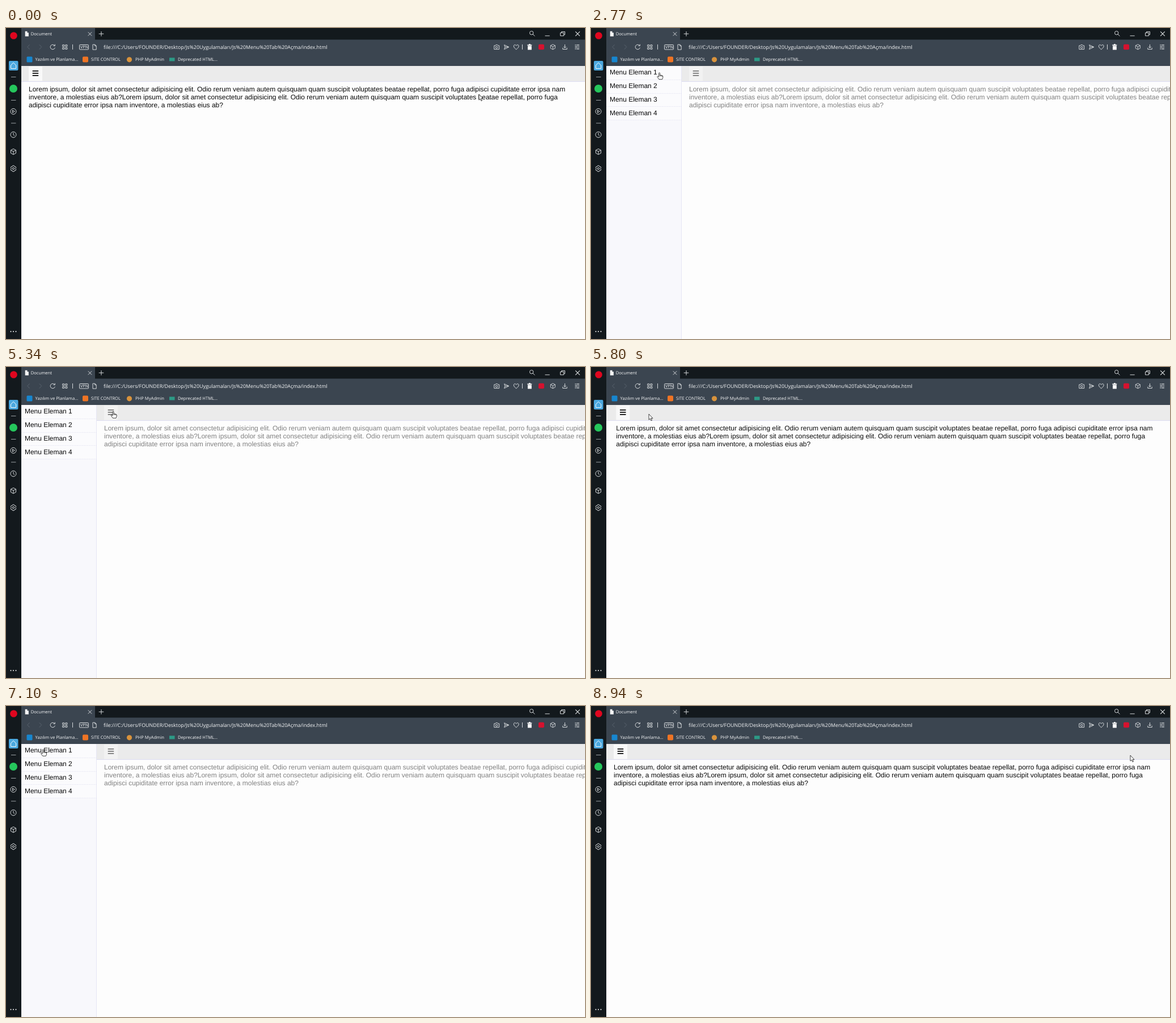
Animation, 1021 px wide and 549 px high, one loop 8970 ms. Source, as an HTML page:

```html
<!DOCTYPE html>
<html lang="tr">
<head>
<meta charset="utf-8">
<title>Document</title>
<style>
  html, body { margin: 0; width: 100%; height: 100%; overflow: hidden; background: #fdfdfd; }
  svg { display: block; width: 100%; height: 100%; }
  text { text-rendering: geometricPrecision; white-space: pre; }
  .page { font: 11.96px "Liberation Sans", Arial, sans-serif; fill: #080808; }
  .ui { font: 7.65px "Open Sans", "Noto Sans", sans-serif; fill: #f4f5f6; }
  .icon { fill: none; stroke: #dde0e2; stroke-width: .95; stroke-linejoin: round; }
  .pointer { fill: #fff; stroke: #222; stroke-width: .85; stroke-linejoin: round; }
</style>
</head>
<body>
<svg viewBox="0 0 1021 549">
  <defs>
    <clipPath id="view"><rect x="26" y="67" width="995" height="482"/></clipPath>
    <path id="cube" d="M0-5 4.5-2.7V2.7L0 5-4.5 2.7V-2.7ZM-4.5-2.7 0-.3 4.5-2.7M0-.3V5"/>
    <path id="cross" d="M-3.2-3.2 3.2 3.2M3.2-3.2-3.2 3.2"/>
    <path id="sheet" d="M-3-4.5H.8L3.2-2V4.5H-3ZM.8-4.5V-2H3.2"/>
  </defs>

  <g clip-path="url(#view)">
    <rect x="26" y="67" width="995" height="482" fill="#fdfdfd"/>
    <rect x="26" y="67" width="995" height="27" fill="#ebebeb"/>
    <path d="M26 94.5H1021" stroke="#dcdcf1"/>

    <g id="menu">
      <rect x="-107" y="67" width="133" height="482" fill="#f8f8fc"/>
      <rect x="-107" y="67" width="133" height="96" fill="#fbfbfd"/>
      <path d="M26.5 67V549" stroke="#e6e6f5"/>
      <path d="M-107 91.5H26M-107 115.5H26M-107 138.5H26M-107 162.5H26" stroke="#e9e9f4" stroke-dasharray="2 1"/>
      <g class="page">
        <text x="-100" y="82.3">Menu Eleman 1</text>
        <text x="-100" y="106.3">Menu Eleman 2</text>
        <text x="-100" y="129.8">Menu Eleman 3</text>
        <text x="-100" y="153.8">Menu Eleman 4</text>
      </g>
    </g>

    <g id="content">
      <rect x="40" y="68" width="24" height="25.5" fill="#f9f9f9"/>
      <path d="M46.7 75.9H57.2M46.7 79.9H57.2M46.7 83.9H57.2" stroke="#080808" stroke-width="1.7"/>
      <g class="page">
        <text x="40" y="111.8">Lorem ipsum, dolor sit amet consectetur adipisicing elit. Odio rerum veniam autem quisquam quam suscipit voluptates beatae repellat, porro fuga adipisci cupiditate error ipsa nam</text>
        <text x="40" y="125.8">inventore, a molestias eius ab?Lorem ipsum, dolor sit amet consectetur adipisicing elit. Odio rerum veniam autem quisquam quam suscipit voluptates beatae repellat, porro fuga</text>
        <text x="40" y="139.6">adipisci cupiditate error ipsa nam inventore, a molestias eius ab?</text>
      </g>
    </g>
  </g>

  <!-- browser frame -->
  <path d="M0 0H1021V21H27V549H0Z" fill="#13191d"/>
  <path d="M27 0H157V20.5H1021V67H27Z" fill="#3b4550"/>

  <!-- sidebar -->
  <circle cx="13.5" cy="13.5" r="6.3" fill="#e0061f"/>
  <rect x="5" y="58" width="16.5" height="17" rx="2" fill="#4ba8df"/>
  <circle cx="13" cy="107" r="7" fill="#25c75c"/>
  <g class="icon">
    <path d="M8.5 66 13 61.2 17.7 66V71.5H8.5Z" stroke="#fff"/>
    <path d="M9 86.5H17.5M9 127.5H17.5M9 168H17.5" stroke="#a5abae"/>
    <circle cx="13" cy="147.3" r="5"/>
    <path d="M11.5 145 15.3 147.3 11.5 149.6Z"/>
    <circle cx="13" cy="188.3" r="5"/>
    <path d="M13 185V188.5L15.2 190"/>
    <use href="#cube" x="13" y="218.3"/>
    <path d="M11.8 243H14.2L15 244.6 17 244.9 17.7 246.6 16.6 248.2 17.7 249.8 17 251.5 15 251.8 14.2 253.4H11.8L11 251.8 9 251.5 8.3 249.8 9.4 248.2 8.3 246.6 9 244.9 11 244.6Z"/>
    <circle cx="13" cy="248.2" r="1.7"/>
  </g>
  <path d="M8.5 535.7H18.5" stroke="#fff" stroke-width="2" stroke-linecap="round" stroke-dasharray="0 4.5"/>

  <!-- tab strip -->
  <use href="#sheet" x="36.7" y="10.3" fill="#f4f4f4"/>
  <g class="icon">
    <use href="#cross" x="148" y="10.5"/>
    <path d="M163.7 10.3H172.3M168 6V14.6"/>
    <circle cx="926.7" cy="8.7" r="3.2"/>
    <path d="M929 11 932.5 14.3M950.5 13.8H958.7"/>
    <path d="M977.5 8.5H983.5V13.8H977.5ZM979.5 8.5V6.5H985.5V11.8H983.5"/>
    <use href="#cross" transform="translate(1008 10.2) scale(1.2)"/>
  </g>

  <!-- address bar -->
  <g class="icon">
    <path d="M41.7 29.5 37.7 33.5 41.7 37.5M58.8 29.5 62.8 33.5 58.8 37.5" stroke="#5b6670"/>
    <path d="M85.7 31A4.2 4.2 0 1 0 86.4 34.7M86.3 28.7V31.5H83.5"/>
    <path d="M99.7 29.8H102.8V32.6H99.7ZM104.8 29.8H107.9V32.6H104.8ZM99.7 34.6H102.8V37.4H99.7ZM104.8 34.6H107.9V37.4H104.8Z"/>
    <path d="M117.5 29V38M910.5 29V38"/>
    <rect x="129.5" y="29.5" width="16" height="8.5" rx="1"/>
    <use href="#sheet" x="156" y="33.7"/>
    <path d="M860.8 31H863L864 29.7H866.5L867.5 31H869.6V37.6H860.8Z"/>
    <circle cx="865.2" cy="34.2" r="1.8"/>
    <path d="M878.6 29.8 886.8 33.6 878.6 37.6 880 33.6ZM880 33.6H886.5"/>
    <path d="M899.7 37.8C893.5 33.5 895 29.5 897.5 29.7 899 29.8 899.7 31.3 899.7 31.3 899.7 31.3 900.4 29.8 902 29.7 904.5 29.5 906 33.5 899.7 37.8Z"/>
    <use href="#cube" transform="translate(964.3 33.4) scale(.9)"/>
    <path d="M985.5 29V35M983.2 32.8 985.5 35.1 987.8 32.8M981.8 34.8V37.5H989.2V34.8"/>
    <path d="M1003 30.2H1011.3M1003 33.5H1011.3M1003 36.8H1011.3M1008.7 29V31.4M1005.3 32.3V34.7M1008.7 35.6V38"/>
  </g>
  <path d="M919.3 29.5H922V28.3H924.8V29.5H927.3V31H919.3ZM920 31.5H926.8V38.5H920Z" fill="#fff"/>
  <rect x="939" y="28.8" width="10" height="9.4" rx="2" fill="#d5122f"/>

  <!-- bookmarks -->
  <rect x="36.5" y="50.5" width="10" height="10" rx="1.5" fill="#1786cf"/>
  <rect x="135" y="50.5" width="10" height="10" rx="2" fill="#ef7424"/>
  <circle cx="217.5" cy="55.8" r="4.6" fill="#d9933c"/>
  <rect x="288" y="52.5" width="9.5" height="6" fill="#2d9a86"/>

  <g class="ui">
    <text x="43.7" y="13.2">Document</text>
    <text x="131" y="36.2" style="font-size:7px">VPN</text>
    <text x="172" y="36.7" style="font-size:8.88px">file:///C:/Users/FOUNDER/Desktop/Js%20Uygulamaları/Js%20Menu%20Tab%20Açma/index.html</text>
    <text x="51.5" y="58.2">Yazılım ve Planlama...</text>
    <text x="150" y="58.2">SITE CONTROL</text>
    <text x="228" y="58.2">PHP MyAdmin</text>
    <text x="303" y="58.2">Deprecated HTML...</text>
  </g>

  <g id="cursor" class="pointer">
    <path id="arrow" d="M0 0V10.2L2.3 8.1 4 11.8 5.6 11 4 7.5H7Z"/>
    <path id="hand" d="M-1 1Q0-.8 1 1V4.6L2.8 4.9 4.8 5.3 6.2 6.3V9L5 12.2H-.6L-3.7 7.8Q-3.6 6.2-2.2 6.8L-1 8ZM1 4.6V6.8M2.9 5V7M4.8 5.3V7.2"/>
  </g>
</svg>

<script>
const LOOP = 8970, MENU_WIDTH = 133;
const MENU_MS = 300, CONTENT_MS = 500;

// [time, open?]
const toggles = [[-1e4, 0], [2100, 1], [5415, 0], [6450, 1], [8130, 0]];

// [time, x, y] of the pointer tip
const route = [
  [0, 834, 117], [300, 834, 117], [1500, 54, 79], [2350, 54, 79],
  [3200, 189, 78], [5420, 189, 78], [5800, 102, 83], [6200, 58, 76],
  [7000, 58, 76], [7700, 188, 78], [8130, 190, 78], [8240, 283, 81],
  [8800, 951, 87], [LOOP, 951, 87]
];

const $ = id => document.getElementById(id);
const clamp = v => Math.min(1, Math.max(0, v));

// cubic-bezier(.25, .1, .25, 1)
function ease(x) {
  if (x <= 0 || x >= 1) return clamp(x);
  const curve = (a, b, u) => 3 * a * u * (1 - u) ** 2 + 3 * b * u * u * (1 - u) + u ** 3;
  let low = 0, high = 1;
  for (let i = 0; i < 24; i++) {
    const mid = (low + high) / 2;
    if (curve(.25, .25, mid) < x) low = mid; else high = mid;
  }
  return curve(.1, 1, low);
}

function openness(t, duration) {
  const [start, open] = toggles.findLast(([time]) => time <= t);
  const p = ease((t - start) / duration);
  return open ? p : 1 - p;
}

function pointerAt(t) {
  const i = route.findIndex(([time]) => time > t);
  const [t0, x0, y0] = route[i - 1], [t1, x1, y1] = route[i];
  const u = (t - t0) / (t1 - t0), s = u * u * (3 - 2 * u);
  return [x0 + (x1 - x0) * s, y0 + (y1 - y0) * s];
}

function draw() {
  const t = performance.now() % LOOP;
  const menuX = MENU_WIDTH * openness(t, MENU_MS);
  const shown = openness(t, CONTENT_MS), contentX = MENU_WIDTH * shown;
  const [x, y] = pointerAt(t);
  const onButton = Math.abs(x - 52 - contentX) < 12 && y > 67 && y < 94;
  const onMenu = x < 27 + menuX && y < 163;

  $('menu').setAttribute('transform', `translate(${menuX})`);
  $('content').setAttribute('transform', `translate(${contentX})`);
  $('content').setAttribute('opacity', 1 - shown / 2);
  $('cursor').setAttribute('transform', `translate(${x} ${y})`);
  $('hand').style.display = onButton || onMenu ? '' : 'none';
  $('arrow').style.display = onButton || onMenu ? 'none' : '';
  requestAnimationFrame(draw);
}
draw();
</script>
</body>
</html>
```
